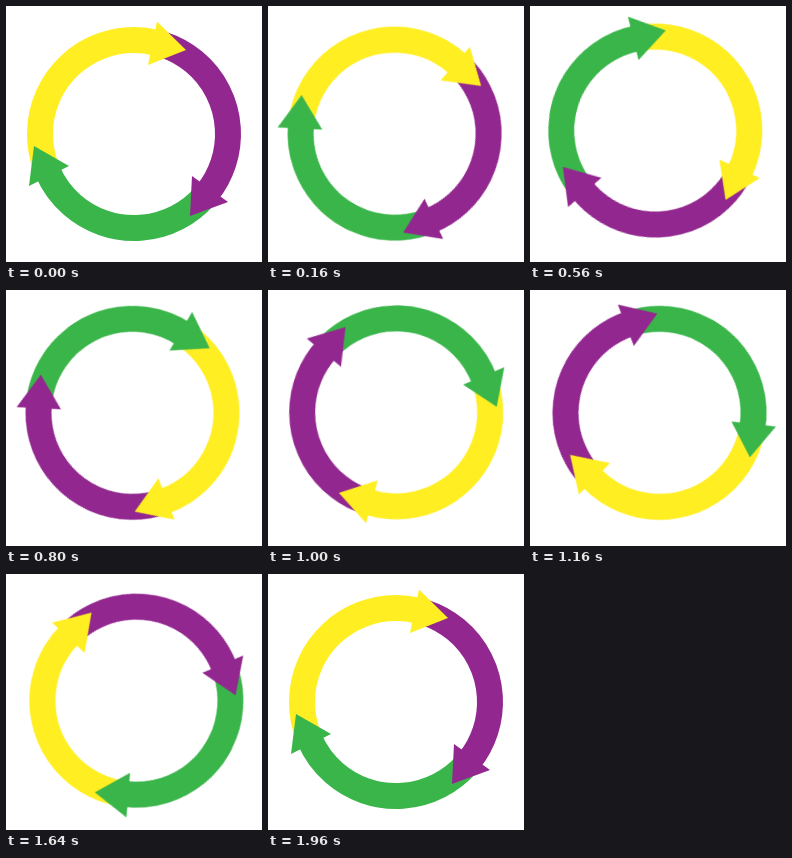
Write an HTML page that moves like this. It is 256x256 px and loops after 2000 ms.

```html
<!DOCTYPE html>
<html lang="en">
<head>
<meta charset="utf-8">
<title>Three-arrow cycle</title>
<style>
  html, body { margin: 0; width: 100%; height: 100%; overflow: hidden; background: #fff; }
  svg { display: block; width: 100%; height: 100%; }

  .yellow { --c: #ffee22; }
  .purple { --c: #92278f; }
  .green { --c: #3ab54a; }
  circle { fill: none; stroke: var(--c); stroke-width: 26; }
  polygon { fill: var(--c); }

  /* The pivot sits slightly above the ring's centre, so the ring wobbles. */
  .cycle {
    transform-origin: 128px 125.2px;
    animation: turn 2s steps(50, jump-none) infinite;
  }
  @keyframes turn {
    from { transform: rotate(0deg); }
    to { transform: rotate(360deg); }
  }
</style>
</head>
<body>
<svg viewBox="0 0 256 256">
  <g class="cycle">
    <g transform="translate(128 128)">
      <!-- Shafts: one path unit per degree, rotated from 3 o'clock -->
      <circle class="yellow" r="94" pathLength="360" stroke-dasharray="125 235" transform="rotate(159)"/>
      <circle class="purple" r="94" pathLength="360" stroke-dasharray="111 249" transform="rotate(-72)"/>
      <circle class="green" r="94" pathLength="360" stroke-dasharray="116 244" transform="rotate(41)"/>
      <!-- Heads -->
      <polygon class="yellow" points="52,-84 23,-112.5 14,-69"/>
      <polygon class="purple" points="56,82 58,42 94,68"/>
      <polygon class="green" points="-100,12 -65,32 -105,52"/>
    </g>
  </g>
</svg>
</body>
</html>
```
